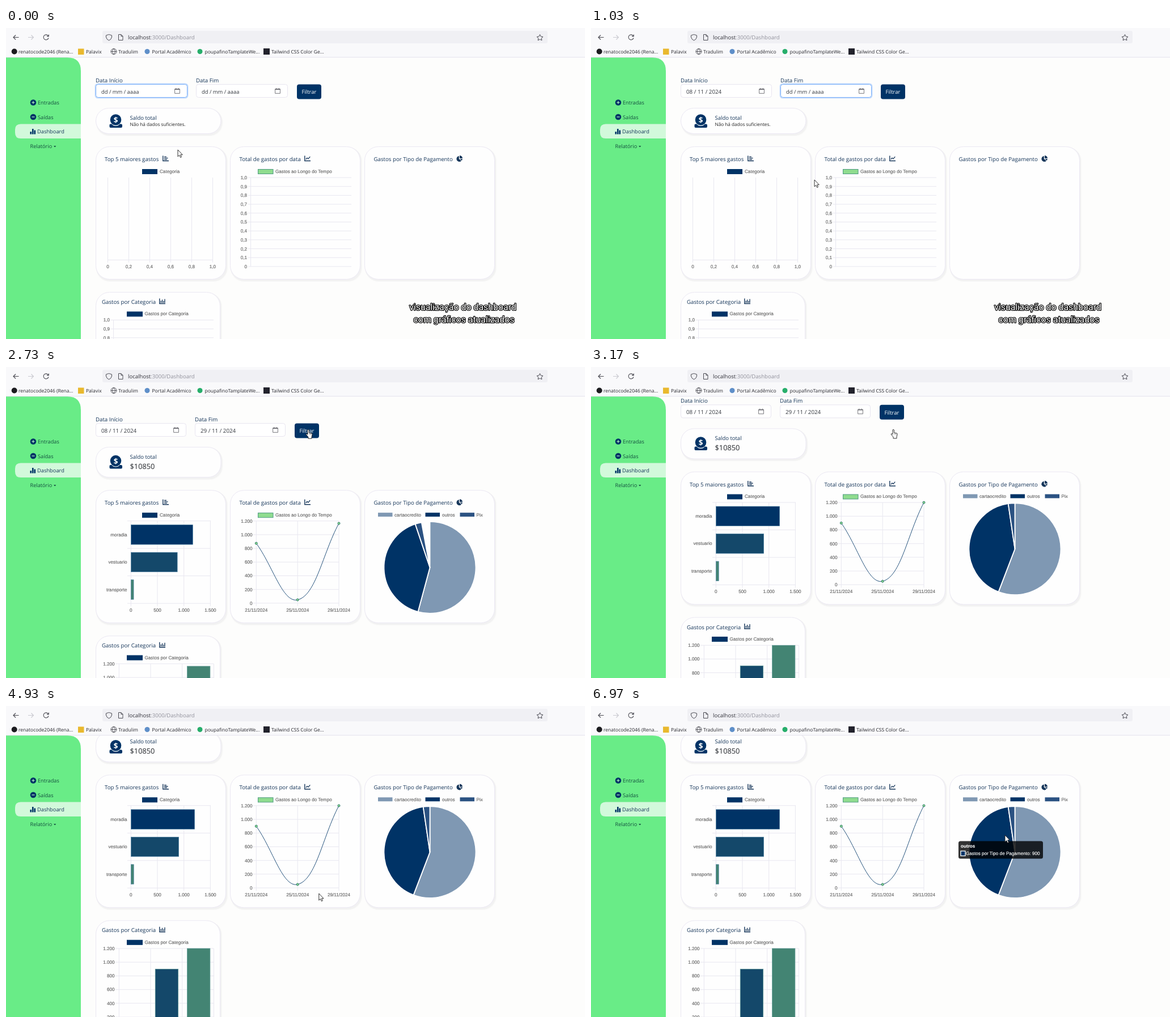
Animation of 1021x549 px, one loop 7010 ms. Source, as an HTML page:

```html
<!DOCTYPE html>
<html lang="pt">
<head>
<meta charset="utf-8">
<title>Dashboard</title>
<style>
  html, body { margin: 0; width: 100%; height: 100%; overflow: hidden; background: #fdfdfc; }
  svg { display: block; width: 100vw; height: 100vh; }
  text { font-family: "Open Sans", "Noto Sans", sans-serif; text-rendering: geometricPrecision; white-space: pre; }
  .chart { font-family: "Liberation Sans", Arial, sans-serif; font-size: 8.15px; stroke: #666; stroke-width: .15px; }
  .tip { font-family: "Liberation Sans", Arial, sans-serif; stroke: #fff; stroke-width: .15px; }
  .caption { font-family: Roboto, sans-serif; stroke: #000; stroke-width: 2.4px; paint-order: stroke; stroke-linejoin: round; }
  .mid { text-anchor: middle; }
  .end { text-anchor: end; }
</style>
</head>
<body>
<svg id="stage" viewBox="0 0 1021 549"></svg>
<script>
const LOOP = 7010;
const NAVY = '#003366', INK = '#16365a', GRID = '#e8e7f0', GREEN = '#69ec87';
const BAR_COLORS = ['#003366', '#14486a', '#438473'];
const PIE_COLORS = ['#7f98b3', '#003366', '#2b5282'];

// Moments of the session, in ms
const START_FILLED = 640, END_FOCUS = 820, END_FILLED = 1300, CLICK = 2230;
const CAPTION_END = 2330, DATA = 2420, DRAWN = 2950, HOVER = 5150, HOVER_NEXT = 6450;
const GROWTH = 8.2; // the balance card gets taller once it has data

const SCROLL = [[2980, 0], [3170, 32.5], [3400, 64], [3900, 80], [4030, 88.5], [4130, 95.9]];
const POINTER = [
  [0, 303, 215], [220, 303, 112], [360, 303, 112], [600, 262, 205], [660, 262, 205], [830, 479, 112],
  [1030, 394, 268], [1350, 394, 268], [1900, 532, 111], [3200, 532, 110], [3700, 461, 366],
  [4700, 461, 366], [5350, 775, 245], [5870, 783, 267], [6300, 783, 267], [6800, 730, 228]
];

const smooth = u => u * u * (3 - 2 * u);
function along(keys, t, ease = u => u) {
  if (t <= keys[0][0]) return keys[0].slice(1);
  const i = keys.findIndex(k => k[0] > t);
  if (i < 0) return keys[keys.length - 1].slice(1);
  const a = keys[i - 1], b = keys[i], u = ease((t - a[0]) / (b[0] - a[0]));
  return a.slice(1).map((v, n) => v + (b[n + 1] - v) * u);
}

const rect = (x, y, w, h, fill, more = '') => `<rect x="${x}" y="${y}" width="${w}" height="${h}" fill="${fill}" ${more}/>`;
const circle = (x, y, r, fill, more = '') => `<circle cx="${x}" cy="${y}" r="${r}" fill="${fill}" ${more}/>`;
const shape = (d, fill, more = '') => `<path d="${d}" fill="${fill}" ${more}/>`;
const stroke = (d, color, w = 1, more = '') => shape(d, 'none', `stroke="${color}" stroke-width="${w}" ${more}`);
const text = (x, y, s, size = 9.7, fill = INK, more = '') =>
  `<text x="${x}" y="${y}" font-size="${size}" fill="${fill}" ${more}>${s}</text>`;
const label = (x, yMid, s, align = '') =>
  `<text x="${x}" y="${yMid + 2.9}" fill="#666" class="chart ${align}">${s}</text>`;
const group = (x, y, body, more = '') => `<g transform="translate(${x} ${y})" ${more}>${body}</g>`;
const number = v => v >= 1000 ? `${Math.floor(v / 1000)}.${String(v % 1000).padStart(3, '0')}` : `${v}`;
const tenths = i => i ? (i / 10).toFixed(1).replace('.', ',') : '0';
const range = n => [...Array(n).keys()];

function grid(xs, ys, left, right, top, bottom) {
  return stroke(xs.map(x => `M${x} ${top}V${bottom}`).join('') + ys.map(y => `M${left} ${y}H${right}`).join(''), GRID);
}

function card(x, y, w, h, r) {
  const size = `rx="${r}"`;
  return rect(x + 1, y + 2, w + 2, h + 2, '#303050', size + ' opacity=".02"') +
    rect(x + 1, y + 1, w + 1, h + 2, '#303050', size + ' opacity=".03"') +
    rect(x + .5, y + .5, w - 1, h - 1, '#fefefe', size + ' stroke="#ebe8f3"');
}

const legend = (x, w, textX, s, fill, border = fill) =>
  rect(x + .5, 249.5, w - 1, 8, fill, `stroke="${border}"`) + label(textX, 253, s);

// Title icons on a 11 x 10 box
const AXES = stroke('M.8 0V9H11', INK, 1.4);
const ICONS = {
  rows: AXES + stroke('M3 1.8H7M3 4.2H9.5M3 6.6H8', INK, 1.3),
  line: AXES + stroke('M2.8 6.3L5 3.8L7 5.4L10.3 1.6', INK, 1.3),
  columns: AXES + stroke('M3.3 7.5V4M5.6 7.5V2M7.9 7.5V4.5M10 7.5V1', INK, 1.3),
  pie: shape('M4.8 .6A5 5 0 1 0 9 9L4.8 5.4Z', INK) + shape('M6 -.4A5.2 5.2 0 0 1 11 4.6H6Z', INK) + shape('M6.4 5.6H11A5 5 0 0 1 9.6 8.4Z', INK)
};
const title = (x, y, s, iconX, icon) => text(x, y, s) + group(iconX, y - 9.5, ICONS[icon]);

function topExpenses(p) {
  let s = card(158, 209, 230, 235, 24) + title(174, 235, 'Top 5 maiores gastos', 276, 'rows') +
    legend(240, 27, 271, 'Categoria', NAVY);
  if (p === null) {
    const xs = range(6).map(i => 179.5 + i * 37);
    return s + grid(xs, [409.5], 180, 365, 264, 414) + xs.map((x, i) => label(x, 421, tenths(i * 2), 'mid')).join('');
  }
  const xs = range(4).map(i => 220.3 + i * 46.7), ys = range(4).map(i => 263.5 + i * 48.5);
  s += grid(xs, ys, 214, 361, 263.5, 414) + xs.map((x, i) => label(x, 420.8, number(i * 500), 'mid')).join('');
  [['moradia', 1200], ['vestuario', 900], ['transporte', 50]].forEach(([name, value], i) => {
    const y = 270.5 + i * 48.5;
    s += rect(220.5, y, value * .0934 * p, 34.5, BAR_COLORS[i], 'stroke="#4a7fa0" stroke-width=".7"') + label(213.5, y + 17, name, 'end');
  });
  return s;
}

function byDate(p) {
  let s = card(395, 209, 230, 235, 24) + title(411.5, 235, 'Total de gastos por data', 526, 'line') +
    legend(444, 27.5, 475, 'Gastos ao Longo do Tempo', '#8fdc8f', '#4d9a80');
  if (p === null) {
    const ys = range(11).map(i => 421 - i * 15.7);
    return s + grid([431.5], ys, 427, 609, 264, 421) + ys.map((y, i) => label(425, y, tenths(i), 'end')).join('');
  }
  const Y = v => 408.7 - v * .1209 * p;
  const xs = [441.3, 514.2, 587], ys = range(7).map(i => 408.7 - i * 24.18);
  s += grid(xs, ys, 435, 587, 263.5, 414) +
    ys.map((y, i) => label(434.5, y, number(i * 200), 'end')).join('') +
    ['21', '25', '29'].map((d, i) => label(xs[i], 420.8, d + '/11/2024', 'mid')).join('');
  const [a, b, c] = [900, 50, 1200].map(Y);
  const lowest = Math.min(408.7, b - (c - a) * .178);
  s += stroke(`M441.3 ${a}C470.5 ${a + (b - a) * .4} 488 ${lowest} 514.2 ${b}` +
    `C546.6 ${b + (c - a) * .222} 558 ${c + (b - c) * .4} 587 ${c}`, '#24527c');
  return s + [a, b, c].map((y, i) => circle(xs[i], y, 2, '#8fdc8f', 'stroke="#2b7a6a"')).join('');
}

function byPayment(p) {
  let s = card(632, 209, 230, 235, 24) + title(648.5, 235, 'Gastos por Tipo de Pagamento', 794, 'pie');
  if (p === null) return s;
  [[656, 685, 'cartaocredito'], [739.5, 769, 'outros'], [800.5, 829.5, 'Pix']].forEach(([x, tx, name], i) => {
    s += rect(x, 249, 25.5, 7, PIE_COLORS[i]) + label(tx, 252.5, name);
  });
  const cx = 747.5, cy = 345.7, r = 81;
  const at = a => `${cx + r * Math.sin(a)} ${cy - r * Math.cos(a)}`;
  let from = 0;
  [1200, 900, 50].forEach((value, i) => {
    const to = from + value / 2150 * Math.PI * 2 * p;
    s += shape(`M${cx} ${cy}L${at(from)}A${r} ${r} 0 ${+(to - from > Math.PI)} 1 ${at(to)}Z`, PIE_COLORS[i], 'stroke="#fff" stroke-width="1.8" stroke-linejoin="round"');
    from = to;
  });
  return s;
}

function byCategory(p) {
  let s = card(158, 466, 220, 235, 24) + title(169, 487, 'Gastos por Categoria', 270, 'columns') +
    group(0, 251.5, legend(213, 28, 244.5, 'Gastos por Categoria', NAVY));
  if (p === null) {
    const ys = range(11).map(i => 515.5 + i * 15.6);
    return s + grid([189.5], ys, 185, 366, 515.5, 672) + ys.map((y, i) => label(183, y, tenths(10 - i), 'end')).join('');
  }
  const ys = range(7).map(i => 515.7 + i * 24.2), base = ys[6];
  s += grid(range(4).map(i => 199.3 + i * 55.7), ys, 193, 366, 515.7, base + 5) +
    ys.map((y, i) => label(191.5, y, number(1200 - i * 200), 'end')).join('');
  [50, 900, 1200].forEach((value, i) => {
    const h = value * .121 * p;
    s += rect(207 + i * 56.2, base - h, 40.5, h, BAR_COLORS[i], 'stroke="#5f9a96" stroke-width=".7"');
  });
  return s;
}

function dateField(x, w, name, value, focused) {
  const ring = focused ? rect(x - .5, 98.5, w + 1, 25, 'none', 'rx="4.5" stroke="#c5dcfd" stroke-width="2"') : '';
  const icon = stroke('M.6 1.8H9.4V9.4H.6ZM2.8 0V2M7.2 0V2', '#6a6a70', .9) + rect(.6, 1.6, 8.8, 1.4, '#6a6a70');
  return text(x, 96, name) + ring +
    rect(x + .5, 99.5, w - 1, 23, '#fff', `rx="4" stroke="${focused ? '#78aef8' : '#e8e5f0'}"`) +
    text(x + 10, 115.5, value || 'dd / mm / aaaa', value ? 9.8 : 9.4, '#33373e') + group(x + w - 23, 106, icon);
}

function filters(t) {
  const w = t < START_FILLED ? 162 : t < END_FILLED ? 161 : 160;
  const endX = 158 + w + 15, buttonX = endX + w + 16;
  const pressed = t > CLICK && t < DATA;
  return dateField(158, w, 'Data Início', t < START_FILLED ? '' : '08 / 11 / 2024', t < END_FOCUS) +
    dateField(endX, w, 'Data Fim', t < END_FILLED ? '' : '29 / 11 / 2024', t >= END_FOCUS && t < CLICK) +
    rect(buttonX, 99.5, 43, 26, NAVY, `rx="4" ${pressed ? 'stroke="#c3d0de" stroke-width=".8"' : ''}`) +
    text(buttonX + 21.5, 116.2, 'Filtrar', 9.5, '#fff', 'class="mid"');
}

function balance(loaded) {
  const icon = circle(193.5, 162, 9.8, NAVY) + text(193.5, 167, '$', 13.5, '#fff', 'class="mid" font-weight="700"') +
    shape('M184 169.5H186.5Q189 173 193.5 173T200.5 169.5H203Q205 169.5 205 171.5V174Q205 176 203 176H184.5Q182.5 176 182.5 174V171.5Q182.5 169.5 184 169.5Z', NAVY);
  return card(158, 141, 221.5, 46 + (loaded ? GROWTH : 0), 23) + group(0, loaded ? GROWTH / 2 - .5 : 0, icon) +
    text(218.5, 162, 'Saldo total', 9.5) +
    (loaded ? text(218.5, 179.7, '$10850', 12.8, '#25282d') : text(218.5, 173, 'Não há dados suficientes.', 8.2, '#222'));
}

function sidebar() {
  const menu = '#14503f';
  return shape('M0 52H108Q132 52 132 76V549H0Z', GREEN) +
    shape('M132 169.5H26Q16 169.5 16 179.5V185Q16 195 26 195H132Z', '#d2f9db') +
    circle(48, 131.5, 5.3, NAVY) + stroke('M45.5 131.5H50.5M48 129V134', '#b8f5c6', 1.2) + text(56, 135.3, 'Entradas', 9.2, menu) +
    circle(48, 157, 5.3, NAVY) + stroke('M45.5 157H50.5', '#b8f5c6', 1.2) + text(56, 160.6, 'Saídas', 9.2, menu) +
    rect(42.5, 183, 2.6, 4.5, NAVY) + rect(46, 178, 2.6, 9.5, NAVY) + rect(49.5, 180.5, 2.6, 7, NAVY) +
    text(55, 186.3, 'Dashboard', 9.3, INK) + text(42.5, 212.3, 'Relatório', 9.2, menu) + shape('M84 208H88.4L86.2 210.4Z', menu);
}

function browser() {
  const dark = '#4a4a52';
  const marks = [
    [22, 'renatocode2046 (Rena...'], [141, 'Palavix'], [198, 'Tradulim'], [257.5, 'Portal Acadêmico'],
    [350.5, 'poupafinoTamplateWe...'], [468, 'Tailwind CSS Color Ge...']
  ];
  return rect(0, 0, 1021, 52, '#f9f9fb') + rect(0, 51.3, 1021, .9, '#e2e0ec') + rect(170, 5, 785, 22, '#f0f0f4', 'rx="3"') +
    stroke('M22.5 16.5H13M17 12.5L13 16.5L17 20.5', dark, 1.1) +
    stroke('M39 16.5H48.5M44.5 12.5L48.5 16.5L44.5 20.5', '#c9c9d0', 1.1) +
    stroke('M74.5 14A4.5 4.5 0 1 0 75 17.5M75.3 11.5V14.6H72', dark, 1.1) +
    stroke('M181.5 11.5L186.5 13V16Q186 20 181.5 22Q177 20 176.5 16V13Z', dark) +
    stroke('M198.5 11.5H203L206 14.5V21.5H198.5ZM203 11.5V14.5H206', dark) +
    text(215, 20.2, 'localhost<tspan fill="#92929c">:3000/Dashboard</tspan>', 9.6, '#33333b') +
    stroke('M941.5 11.5L943.2 15L947 15.5L944.2 18.1L944.9 21.8L941.5 20L938.1 21.8L938.8 18.1L936 15.5L939.8 15Z', dark) +
    circle(14.7, 41.5, 5, '#1b1b1f') + rect(127, 36.5, 10.5, 10.5, '#e9b92e') +
    stroke('M185 41.5A5 5 0 1 0 195 41.5A5 5 0 1 0 185 41.5H195M190 36.5Q185 41.5 190 46.5Q195 41.5 190 36.5', dark, .9) +
    circle(249, 41.5, 4.5, '#5f8fc9') + circle(342, 41.5, 4.5, '#27ae6b') + rect(454, 36, 11, 11, '#22222c') +
    marks.map(([x, s]) => text(x, 44.7, s, 8.5, '#26262c')).join('');
}

function tooltip(t) {
  if (t < HOVER) return '';
  const u = smooth(Math.min(1, Math.max(0, (t - HOVER_NEXT) / 130)));
  const next = t >= HOVER_NEXT;
  const x = 692 - 44 * u, y = 250 - 11.5 * u, w = 154 - 5 * u;
  return group(x, y,
    rect(0, 0, w, 31, '#000', 'rx="3.5" opacity=".8"') +
    text(4, 11.3, next ? 'outros' : 'cartaocredito', 8.15, '#fff', 'class="tip" font-weight="700"') +
    rect(4, 17.5, 8, 8.5, PIE_COLORS[+next], 'stroke="#fff" stroke-width="1.3"') +
    text(13, 24.8, 'Gastos por Tipo de Pagamento: ' + (next ? '900' : '1.200'), 8.15, '#fff', 'class="tip"'),
    `opacity="${Math.min(1, (t - HOVER) / 150)}"`);
}

function pointer(t) {
  const [x, y] = along(POINTER, t, smooth);
  const edge = 'stroke="#1a1a1a" stroke-width=".9" stroke-linejoin="round"';
  return group(x, y, t > 1850 && t < 3250
    ? shape('M0 1Q1.2 -.5 2.4 1V6L7.5 7Q8.2 7.3 8 9L7 13.5V16H1V13.5L-2.7 9Q-3 7.5 -1.5 7.7L0 9Z', '#fff', edge) + stroke('M3.7 7V9.5M5.7 7.5V9.5', '#444', .6)
    : shape('M0 0V12L2.7 9.5L4.6 13.6L6.5 12.7L4.7 8.8H8.3Z', '#fff', edge));
}

function caption() {
  return text(805.5, 498, 'visualização do dashboard', 15.9, '#fff', 'class="caption mid"') +
    text(807.5, 519.5, 'com gráficos atualizados', 15.9, '#fff', 'class="caption mid"');
}

function scene(t) {
  const loaded = t >= DATA;
  const p = loaded ? 1 - (1 - Math.min(1, (t - DATA) / (DRAWN - DATA))) ** 4 : null;
  const charts = topExpenses(p) + byDate(p) + byPayment(p) + byCategory(p);
  return rect(0, 0, 1021, 549, '#fdfdfc') +
    group(0, -along(SCROLL, t)[0], filters(t) + balance(loaded) + group(0, loaded ? GROWTH : 0, charts)) +
    sidebar() + browser() + tooltip(t) + (t < CAPTION_END ? caption() : '') + pointer(t);
}

const stage = document.getElementById('stage');
const began = performance.now();
function frame() {
  stage.innerHTML = scene((performance.now() - began) % LOOP);
  requestAnimationFrame(frame);
}
frame();
</script>
</body>
</html>
```
